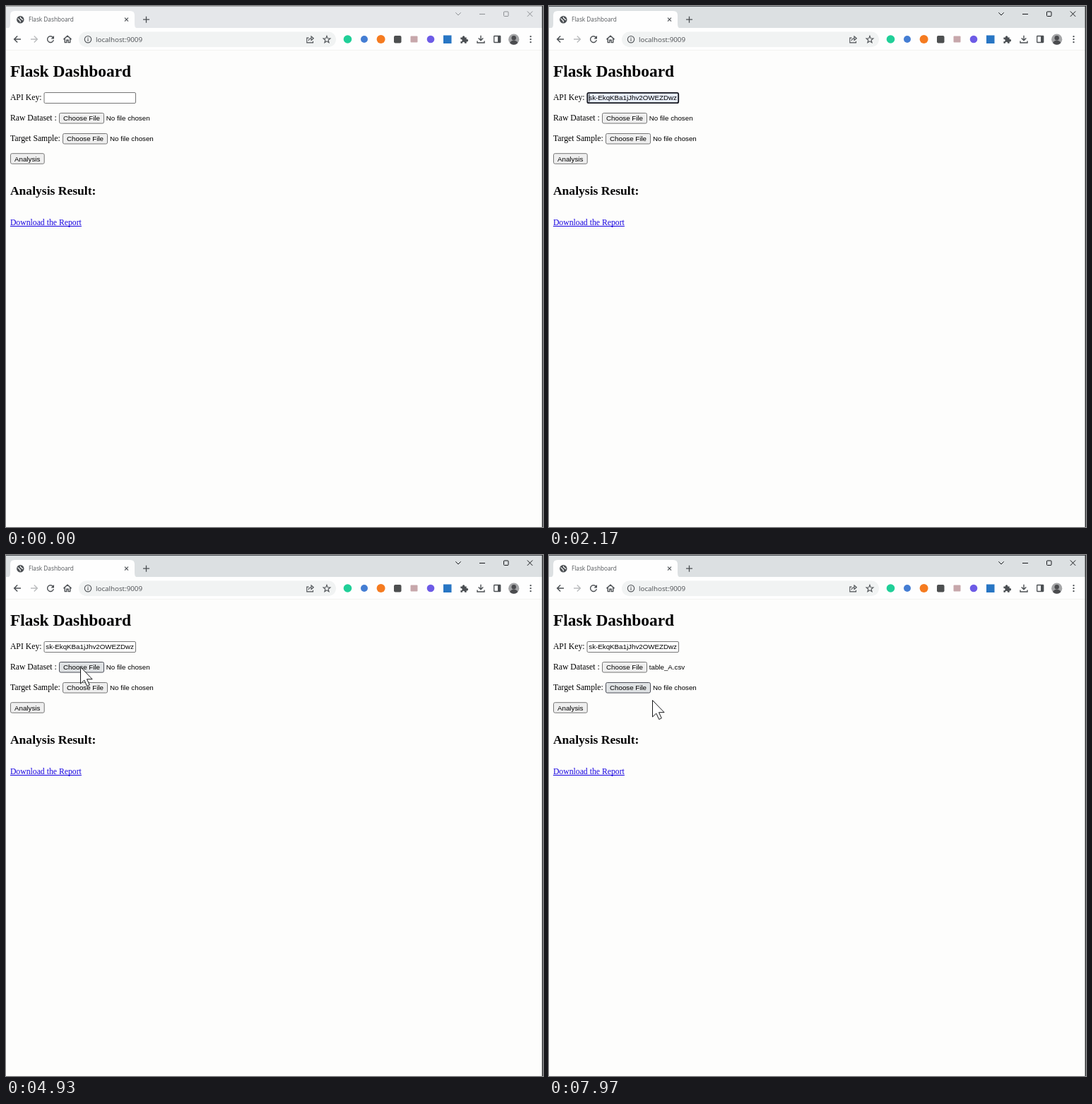
An HTML page with a canvas for the animation above (8 s loop, 760x737 px).

```html
<!DOCTYPE html>
<html lang="en">
<head>
<meta charset="utf-8">
<title>Flask Dashboard</title>
<style>
  html, body { margin: 0; width: 100%; height: 100%; overflow: hidden; background: #fdfdfc; }
  canvas { display: block; }
</style>
</head>
<body>
<canvas id="stage" width="760" height="737"></canvas>
<script>
const LOOP = 8000;
const ctx = document.getElementById('stage').getContext('2d');
const SERIF = '"Liberation Serif", "Times New Roman", serif';
const SANS = '"Liberation Sans", Arial, sans-serif';
const UI = '"Open Sans", sans-serif';
const KEY = 'sk-EkqKBa1jJhv2OWEZDwz';
const INK = '#4b4f53';

// Spans in ms during which the browser window has focus
const ACTIVE = [[1100, 2730], [4930, 6130], [7570, LOOP]];
// Pointer stops: time, x, y
const PATH = [
  [2430, 100, 138], [2640, 105, 158], [5000, 105, 158],
  [5700, 124, 187], [7570, 124, 187], [7970, 146, 205]
];

function text(str, x, y, font, color = '#000') {
  ctx.font = font;
  ctx.fillStyle = color;
  ctx.fillText(str, x, y);
}

function rect(x, y, w, h, color) {
  ctx.fillStyle = color;
  ctx.fillRect(x, y, w, h);
}

function box(x, y, w, h, r, fill, stroke, lw = 1) {
  ctx.beginPath();
  ctx.roundRect(x, y, w, h, r);
  if (fill) { ctx.fillStyle = fill; ctx.fill(); }
  if (stroke) { ctx.strokeStyle = stroke; ctx.lineWidth = lw; ctx.stroke(); }
}

function disc(x, y, r, fill) {
  ctx.beginPath();
  ctx.arc(x, y, r, 0, Math.PI * 2);
  ctx.fillStyle = fill;
  ctx.fill();
}

// Path drawn around a centre point
function icon(x, y, d, { stroke, fill, lw = 1.3 } = {}) {
  const p = new Path2D(d);
  ctx.save();
  ctx.translate(x, y);
  if (fill) { ctx.fillStyle = fill; ctx.fill(p); }
  if (stroke) { ctx.strokeStyle = stroke; ctx.lineWidth = lw; ctx.stroke(p); }
  ctx.restore();
}

function drawTitleBar(active) {
  const tone = active ? '#17191c' : '#8d9094';
  rect(0, 0, 760, 32, active ? '#dce0e2' : '#e5e7ea');
  rect(0, 0, 760, 1, active ? '#50555a' : '#a2a4a6');

  icon(0, 0, 'M0 32 Q6 32 6 26 V13 Q6 7 12 7 H176 Q182 7 182 13 V26 Q182 32 188 32 Z', { fill: '#fefefe' });
  disc(20.3, 19.2, 5.2, INK);
  icon(20.3, 19.2, 'M-3.7 -1.5 Q-2 -.6 -1.1 .9 Q.4 1.2 -.2 3.6 M.2 -3.8 Q-.4 -1.9 1.4 -1.5 Q2 .2 3.8 .5', { stroke: '#fefefe', lw: 1.2 });
  text('Flask Dashboard', 32, 22.2, '8.25px ' + UI, '#53565a');
  icon(170.5, 19.2, 'M-2.5 -2.5 L2.5 2.5 M2.5 -2.5 L-2.5 2.5', { stroke: INK, lw: 1.1 });
  icon(198.5, 19.2, 'M-4.5 0 H4.5 M0 -4.5 V4.5', { stroke: INK });

  icon(640, 11, 'M-3.7 -1.7 L0 2 L3.7 -1.7', { stroke: tone, lw: 1 });
  icon(674, 11.5, 'M-4 0 H4', { stroke: tone, lw: 1 });
  box(704.5, 8, 6.5, 6.5, 1, null, tone);
  icon(741.5, 11.2, 'M-3.7 -3.7 L3.7 3.7 M3.7 -3.7 L-3.7 3.7', { stroke: tone, lw: 1 });
}

function drawToolbar() {
  const line = { stroke: INK, lw: 1.4 };
  const thin = { stroke: INK, lw: 1.1 };
  rect(0, 31, 760, 32, '#fefefe');
  rect(0, 62.5, 760, 1, '#e8e9e5');

  const arrow = 'M5 0 H-4.3 M.2 -4.6 L-4.4 0 L.2 4.6';
  icon(16, 47, arrow, line);
  ctx.save();
  ctx.translate(40, 47);
  ctx.scale(-1, 1);
  icon(0, 0, arrow, { stroke: '#babcbe', lw: 1.4 });
  ctx.restore();
  icon(63, 47, 'M3.4 -2.7 A4.4 4.4 0 1 0 4.3 1.1', line);
  icon(63, 47, 'M5 -5 V-.5 H.5 Z', { fill: INK });
  icon(87, 47, 'M-5.6 .3 L0 -4.8 L5.6 .3 M-3.7 -.8 V4.6 H-1.2 V1.2 H1.2 V4.6 H3.7 V-.8', line);

  box(103, 36.5, 364, 21.5, 10.75, '#f1f3f3');
  icon(116, 47.2, 'M4.7 0 A4.7 4.7 0 1 1 -4.7 0 A4.7 4.7 0 1 1 4.7 0 M0 -.6 V2.6 M0 -2.6 V-1.4', thin);
  text('localhost:9009', 127, 50.8, '9.8px ' + UI, '#4a4d51');
  icon(430.5, 47.5, 'M-2 -2.4 H-4.7 V4.4 H4 V2.2 M-2.4 1.6 Q-1.7 -1.8 2 -1.8 M1.5 -4.5 L4.8 -1.7 L1.5 1 Z', thin);

  let star = '';
  for (let i = 0; i < 10; i++) {
    const a = -Math.PI / 2 + i * Math.PI / 5, r = i % 2 ? 2.2 : 5.2;
    star += (i ? 'L' : 'M') + r * Math.cos(a) + ' ' + r * Math.sin(a);
  }
  icon(454, 47.6, star + 'Z', thin);

  disc(483.5, 47, 5.8, '#20cf98');
  disc(507, 47, 5, '#447dd3');
  disc(530.6, 47, 6, '#f57b20');
  box(549, 42, 10.5, 10.5, 2, '#4d4f50');
  box(572.5, 42.5, 10, 9, 1, '#c7a7ab');
  disc(601, 47, 5.3, '#6d5be6');
  rect(619, 41.5, 11.5, 11.5, '#2876c4');

  icon(648, 47.5, 'M-4.6 -3 H-2 A1.7 1.7 0 1 1 1.2 -3 H3.7 V-.3 A1.7 1.7 0 1 1 3.7 2.8 V5.3 H1 A1.6 1.6 0 1 0 -2 5.3 H-4.6 V2.6 A1.6 1.6 0 1 0 -4.6 -.3 Z', { fill: INK });
  icon(672, 47, 'M0 -5.3 V1.6 M-3.3 -1.6 L0 1.8 L3.3 -1.6 M-5 2.5 V5 H5 V2.5', line);
  box(690.7, 42.5, 9, 9, .5, null, INK, 1.3);
  rect(696, 42.5, 4, 9, INK);

  disc(718.7, 47.2, 7.6, '#a4a5a7');
  ctx.save();
  ctx.beginPath();
  ctx.arc(718.7, 47.2, 7.6, 0, Math.PI * 2);
  ctx.clip();
  disc(718.7, 45.3, 3.2, '#4a4b4e');
  disc(718.7, 54.6, 6, '#4a4b4e');
  ctx.restore();
  for (const dy of [-4, 0, 4]) disc(742.5, 47.2 + dy, 1.15, INK);
}

function button(label, x, y, w, hover) {
  box(x + .5, y + .5, w - 1, 14.5, 2, hover ? '#dfe2e4' : '#efefef', hover ? '#4c4f59' : '#767676');
  text(label, x + 6, y + 11.3, '9.76px ' + SANS);
}

function fileName(name, x, y) {
  text(name, x, y, '9.76px ' + SANS);
}

function drawInput(t) {
  const focused = t >= 1070 && t < 2700;
  const preview = t >= 1900 && t < 2400;
  const fill = preview ? '#e8eefa' : '#fff';
  if (focused) box(54.3, 122.8, 128.9, 14.4, 2, fill, '#14161f', 1.8);
  else box(54, 122.5, 129.5, 15, 1.5, fill, '#767676');
  if (t >= 1900) fileName(KEY, 56.3, 133.2);
  if (focused && (t < 1570 || preview)) rect(56.5, 124.5, 1, 11, '#222');
}

function drawPage(t) {
  const body = '11.72px ' + SERIF;
  rect(0, 63, 760, 674, '#fdfdfc');
  text('Flask Dashboard', 5.9, 100.2, 'bold 23.43px ' + SERIF);
  text('API Key:', 5.9, 133.3, body);
  drawInput(t);

  text('Raw Dataset :', 5.9, 162.2, body);
  button('Choose File', 75, 151, 64, t >= 2560 && t < 5230);
  fileName(t < 4970 ? 'No file chosen' : 'table_A.csv', 141.8, 162.3);

  text('Target Sample:', 5.9, 191.2, body);
  button('Choose File', 80, 180, 64, t >= 5510);
  fileName('No file chosen', 147, 191.3);
  button('Analysis', 6, 208.2, 48.7, false);

  text('Analysis Result:', 5.9, 267.3, 'bold 17.57px ' + SERIF);
  text('Download the Report', 5.9, 310.2, body, '#1500e0');
  rect(5.9, 311, 101, 1, '#1500e0');
}

function pointerAt(t) {
  if (t < PATH[0][0]) return null;
  for (let i = 1; i < PATH.length; i++) {
    const [t0, x0, y0] = PATH[i - 1], [t1, x1, y1] = PATH[i];
    if (t < t1) {
      const u = (t - t0) / (t1 - t0), k = u * u * (3 - 2 * u);
      return [x0 + (x1 - x0) * k, y0 + (y1 - y0) * k];
    }
  }
  return PATH[PATH.length - 1].slice(1);
}

function drawPointer(t) {
  const pos = pointerAt(t);
  if (!pos) return;
  icon(Math.round(pos[0]) + .5, Math.round(pos[1]) + .5,
    'M0 0 V23.5 L5.3 18.6 L9.2 27 L12.8 25.3 L9 17.2 H16.6 Z',
    { fill: '#fff', stroke: '#16181a', lw: 1 });
}

function frame(now) {
  const t = now % LOOP;
  drawTitleBar(ACTIVE.some(([a, b]) => t >= a && t < b));
  drawToolbar();
  drawPage(t);
  rect(758.6, 0, 1.4, 737, '#2c2e30');
  drawPointer(t);
}

const start = performance.now();
function tick() {
  frame(performance.now() - start);
  requestAnimationFrame(tick);
}
tick();
</script>
</body>
</html>
```
